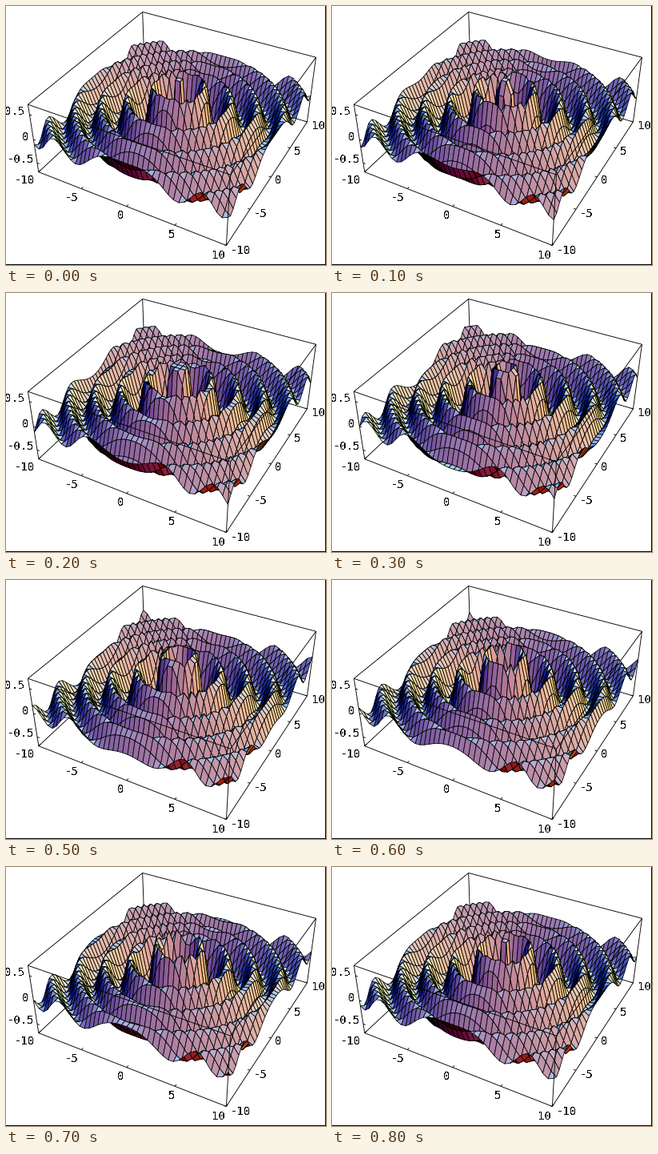
A matplotlib script for the animation above (900 ms loop, 400 by 324 pixels).

```python
import numpy as np
import matplotlib as mpl
import matplotlib.pyplot as plt
from matplotlib.animation import FuncAnimation
from matplotlib.collections import LineCollection, PolyCollection
from matplotlib.patches import Rectangle

W, H, DPI = 400, 324, 100
PX = 72 / DPI                      # one pixel in points
STEPS, INTERVAL = 9, 100
N, R, ZMAX = 40, 10, 0.7           # mesh points, half range, height limit
WAVE, AMP, DECAY = 2.5, 1.2, 0.75

mpl.rcParams["text.antialiased"] = False

# Camera: perspective view of a 1 x 1 x 0.4 box
EYE = np.array([1.3, -2.4, 2.0])
DIST = np.linalg.norm(EYE)
TOWARD = EYE / DIST
RIGHT = np.cross([0, 0, 1], TOWARD)
RIGHT /= np.linalg.norm(RIGHT)
UP = np.cross(TOWARD, RIGHT)
VIEW = np.array([RIGHT, UP, TOWARD])
SCALE, CX, CY = 255.67, 216.4, 135.0

# Red, green and blue lamps in view coordinates
LAMPS = np.array([[1, 0, 1], [1, 1, 1], [0, 1, 1]], float)
LAMPS /= np.linalg.norm(LAMPS, axis=1, keepdims=True)


def to_box(x, y, z):
    return np.stack(np.broadcast_arrays(x / (2 * R), y / (2 * R), 0.2 * z / ZMAX), -1)


def project(p):
    v = p @ VIEW.T
    s = SCALE / (1 - v[..., 2] / DIST)
    return np.stack([CX + v[..., 0] * s, CY - v[..., 1] * s], -1)


def quads(a):
    """Corners of every mesh cell, from the far corner to the near one."""
    c = np.stack([a[:-1, :-1], a[1:, :-1], a[1:, 1:], a[:-1, 1:]], 2)
    return c.reshape(-1, 4, a.shape[-1])


def shade(cells):
    """Light each cell by its normal after the perspective transform."""
    n = np.cross(cells[:, 2] - cells[:, 0], cells[:, 3] - cells[:, 1])
    depth = np.sum(n * (EYE - cells.mean(1)), axis=1)
    n = np.stack([n @ RIGHT, n @ UP, depth], -1)
    n *= np.where(depth < 0, -1, 1)[:, None]
    n /= np.linalg.norm(n, axis=1, keepdims=True)
    return np.clip(n @ LAMPS.T, 0, 1)


gx, gy = np.meshgrid(np.linspace(-R, R, N), np.linspace(R, -R, N), indexing="ij")
rad = np.hypot(gx, gy)
envelope = AMP / rad ** DECAY


def surface(i):
    phase = 2 * np.pi * i / (STEPS - 1)
    z = np.clip(envelope * np.cos(WAVE * rad - phase), -ZMAX, ZMAX)
    return quads(to_box(gx, gy, z))


fig = plt.figure(figsize=(W / DPI, H / DPI), dpi=DPI, facecolor="white")
ax = fig.add_axes([0, 0, 1, 1])
ax.set_xlim(0, W)
ax.set_ylim(H, 0)
ax.axis("off")


def add_lines(segs, z):
    ax.add_collection(LineCollection(segs, colors="black", linewidths=0.9 * PX,
                                     zorder=z))


def box_edges():
    """Edges meeting the far bottom corner, then all the others."""
    far = (-1, 1, -1)
    back, front = [], []
    for axis in range(3):
        for a in (-1, 1):
            for b in (-1, 1):
                ends = np.array([np.insert([a, b], axis, e) for e in (-1, 1)])
                hidden = any(tuple(e) == far for e in ends)
                seg = project(ends * [0.5, 0.5, 0.2])
                (back if hidden else front).append(seg)
    return back, front


def tick(x, y, z, dx, dy):
    a, b = project(to_box(np.array([x, x + dx]), np.array([y, y + dy]), z))
    d = b - a
    return [a, a + 3 * d / np.hypot(*d)]


def label(x, y, s):
    ax.text(x, y, s, family="DejaVu Sans Mono", size=14 * PX, color="black",
            ha="center", va="center_baseline", zorder=4)


back, front = box_edges()
add_lines(back, 1)
add_lines(front, 3)

marks = (-10, -5, 0, 5, 10)
ticks = [tick(v, -R, -ZMAX, 0, 1) for v in marks]
ticks += [tick(R, v, -ZMAX, -1, 0) for v in marks]
ticks += [tick(-R, -R, v, 1, 0) for v in (-0.5, 0, 0.5)]
add_lines(ticks, 3)

x_spots = [(23, 217), (82, 239), (143, 261), (207, 285), (266, 310)]
y_spots = [(293, 304), (318, 259), (340, 217), (364, 181), (391, 149)]
for spots in (x_spots, y_spots):
    for v, (px, py) in zip(marks, spots):
        label(px, py, str(v))
for s, px, py in (("0.5", 11, 131), ("0", 24, 162), ("-0.5", 18, 191)):
    label(px, py, s)

# Thin rule along the right and bottom sides
for x, y, w, h in ((W - 1, 0, 1, H), (0, H - 1, W, 1)):
    ax.add_patch(Rectangle((x, y), w, h, color="black", lw=0, zorder=5))

mesh = PolyCollection([], edgecolors="black", linewidths=0.8 * PX,
                      joinstyle="bevel", zorder=2)
ax.add_collection(mesh)


def draw(i):
    cells = surface(i)
    mesh.set_verts(project(cells))
    mesh.set_facecolor(shade(cells))
    return [mesh]


anim = FuncAnimation(fig, draw, frames=STEPS, interval=INTERVAL,
                     init_func=lambda: draw(0), repeat=True, repeat_delay=0)
plt.show()
```
